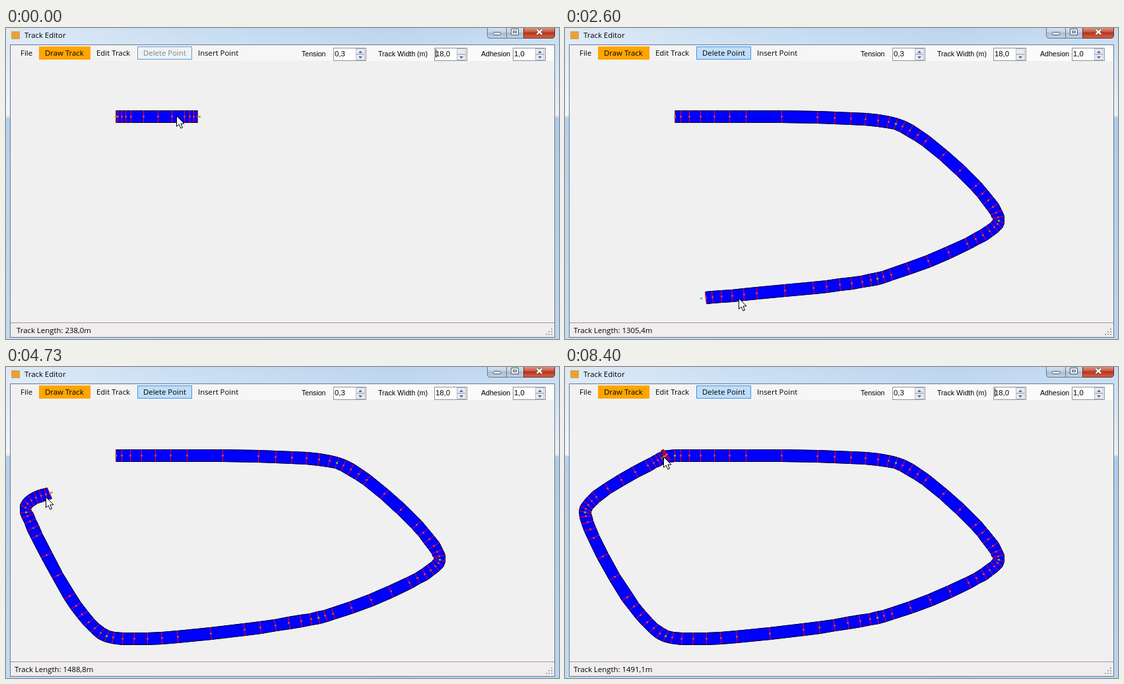
An HTML page with a canvas that plays this animation: 838x472 px, repeating every 8600 ms.

```html
<!DOCTYPE html>
<html lang="en">
<head>
<meta charset="utf-8">
<title>Track Editor</title>
<style>
  html, body { margin: 0; width: 100%; height: 100%; overflow: hidden; background: #c4daf0; }
  svg, canvas { position: absolute; left: 0; top: 0; width: 838px; height: 472px; }
  .ui { font: 11.4px "Open Sans", "Noto Sans", sans-serif; }
  .small { font: 10.6px "Liberation Sans", Arial, sans-serif; }
  .num { font: 11.3px "Liberation Sans", Arial, sans-serif; }
</style>
</head>
<body>
<svg viewBox="0 0 838 472">
  <defs>
    <linearGradient id="glass">
      <stop offset="0" stop-color="#dce9f6"/><stop offset=".3" stop-color="#c9def3"/>
      <stop offset=".7" stop-color="#bbd4ee"/><stop offset="1" stop-color="#c6dcf2"/>
    </linearGradient>
    <linearGradient id="side" x2="0" y2="1">
      <stop offset="0" stop-color="#fff" stop-opacity="0"/><stop offset=".28" stop-color="#fff" stop-opacity=".6"/>
      <stop offset=".29" stop-color="#9dc0e6" stop-opacity=".6"/><stop offset="1" stop-color="#b4d0ee" stop-opacity=".6"/>
    </linearGradient>
    <linearGradient id="strip">
      <stop offset="0" stop-color="#f1f1f1"/><stop offset="1" stop-color="#fcfcfc"/>
    </linearGradient>
    <linearGradient id="btn" x2="0" y2="1">
      <stop offset="0" stop-color="#d6e2ef"/><stop offset=".45" stop-color="#c2d2e4"/>
      <stop offset=".5" stop-color="#a6bbd2"/><stop offset="1" stop-color="#bfd3e8"/>
    </linearGradient>
    <linearGradient id="close" x2="0" y2="1">
      <stop offset="0" stop-color="#dd9c8c"/><stop offset=".4" stop-color="#cd5c48"/>
      <stop offset=".5" stop-color="#b8321c"/><stop offset="1" stop-color="#d06a48"/>
    </linearGradient>
  </defs>
  <rect width="838" height="472" fill="url(#glass)"/>
  <rect width="838" height="472" fill="url(#side)"/>
  <rect x="8" y="5" width="13" height="12" fill="#e5a23c"/>
  <text class="ui" x="28" y="15">Track Editor</text>

  <g stroke="#66788c">
    <path d="M729.5-1V11q0 4.500 4.500 4.500H758.500V-1zM758.500-1V15.500H784.500V-1z" fill="url(#btn)"/>
    <path d="M784.500-1V15.500H827q4.500 0 4.500-4.500V-1z" fill="url(#close)" stroke="#6b2b25"/>
  </g>
  <g fill="#fff" stroke="#4a5566">
    <rect x="738.500" y="6.500" width="11" height="4" rx="1"/>
    <path d="M765.500 1.500h11v9h-11zM768.500 4.500v3h5v-3z" fill-rule="evenodd"/>
  </g>
  <path d="M804.500 2.500l7.500 7m0-7l-7.500 7" stroke="#5d3a3a" stroke-width="4"/>
  <path d="M804.500 2.500l7.500 7m0-7l-7.500 7" stroke="#fff" stroke-width="2.400"/>

  <rect x="6.500" y="25.500" width="825" height="444" fill="#f0f0f0" stroke="#66788c"/>
  <rect x="7" y="26" width="824" height="24" fill="url(#strip)"/>
  <rect x="50" y="28" width="78" height="20" fill="#ffa500"/>
  <rect id="del" x="199.500" y="28.500" width="82" height="19"/>
  <g class="ui">
    <text x="22" y="42">File</text>
    <text x="59" y="42">Draw Track</text>
    <text x="137" y="42">Edit Track</text>
    <text id="delText" x="208" y="42">Delete Point</text>
    <text x="291" y="42">Insert Point</text>
  </g>
  <g class="small">
    <text x="448" y="43">Tension</text>
    <text x="564" y="43">Track Width (m)</text>
    <text x="720" y="43">Adhesion</text>
  </g>
  <g id="boxes"></g>
  <path id="caret" d="M651.500 32v13" stroke="#000"/>

  <rect x="7" y="447" width="824" height="22" fill="#f1eded"/>
  <path d="M7 447.500H831" stroke="#8f8f8f"/>
  <path d="M7 448.500H831" stroke="#fff"/>
  <text class="ui" id="status" y="463"></text>
  <g id="grip" fill="#a8a8a8"></g>
</svg>
<canvas id="view" width="838" height="472"></canvas>

<script>
const $ = id => document.getElementById(id);
const ctx = $('view').getContext('2d');
const LOOP = 8600, STEP = 1000 / 15;
const TENSION = 0.3, HALF = 9, FLAT = 6;
const START = [166, 134];

// Each click fixes a track point; the mouse then glides through rows of [step, x, y, metres].
const strokes = [
  { click: -1, way: [[-1, 258, 133, 190], [0, 293, 134, 238], [6, 501, 145, 655]] },
  { click: 10, way: [[9, 501, 145, 655], [11, 615, 207, 920], [12, 661, 246, 1030.8], [16, 657, 292, 1072]] },
  { click: 19, way: [[18, 657, 292, 1072], [21, 651, 335, 1120], [22, 632, 354, 1136.3], [26, 473, 380, 1209]] },
  { click: 32, way: [[31, 473, 380, 1209], [38, 263, 410, 1288], [39, 206, 410, 1305.4], [42, 152, 408, 1331]] },
  { click: 45, way: [[44, 152, 408, 1331], [54, 22, 240, 1478], [60, 30, 220, 1492.4]] },
  { click: 62, way: [[64, 30, 220, 1492.4], [79, 145, 132, 1482], [80, 148, 133, 1482.9], [83, 149, 136, 1484.3]] },
  { click: 99, way: [[99, 149, 136, 1491.1]] }
];

// Hermite glide that rests at both ends of a stroke.
function glide(way, k) {
  const n = way.length - 1;
  if (k <= way[0][0]) return way[0].slice(1);
  if (k >= way[n][0]) return way[n].slice(1);
  const i = way.findIndex(r => r[0] > k) - 1, a = way[i], b = way[i + 1];
  const slope = (m, j) => m && m < n ? (way[m + 1][j] - way[m - 1][j]) / (way[m + 1][0] - way[m - 1][0]) : 0;
  const h = b[0] - a[0], u = (k - a[0]) / h, s = u * u * (3 - 2 * u);
  return [1, 2, 3].map(j => a[j] + (b[j] - a[j]) * s
    + h * u * (1 - u) * ((1 - u) * slope(i, j) - u * slope(i + 1, j)));
}
const mouse = k => glide(strokes.filter(s => s.way[0][0] <= k).pop()?.way || strokes[0].way, k);

// Hybrid forward differencing with adaptive step size.
function flatten(a, b, c, d) {
  const axes = [0, 1].map(j => ({
    p: a[j], e1: d[j] - a[j], e2: 6 * (b[j] - 2 * c[j] + d[j]), e3: 6 * (a[j] - 2 * b[j] + c[j])
  }));
  const rough = () => axes.some(q => Math.max(Math.abs(q.e2), Math.abs(q.e3)) > FLAT);
  const loose = () => axes.every(q => Math.max(Math.abs(q.e3), Math.abs(2 * q.e2 - q.e3)) <= FLAT / 4);
  let n = 1;
  const halve = () => {
    n *= 2;
    for (const q of axes) { q.e2 = (q.e2 + q.e3) / 8; q.e1 = (q.e1 - q.e2) / 2; q.e3 /= 4; }
  };
  const double = () => {
    n /= 2;
    for (const q of axes) { q.e1 += q.e1 + q.e2; q.e3 *= 4; q.e2 = q.e2 * 8 - q.e3; }
  };
  while (rough() && n < 64) halve();
  const out = [];
  for (;;) {
    if (rough()) halve();
    while (n % 2 === 0 && loose()) double();
    if (--n < 1) break;
    for (const q of axes) {
      const e = q.e2;
      q.p += q.e1; q.e1 += e; q.e2 += e - q.e3; q.e3 = e;
    }
    out.push([axes[0].p, axes[1].p]);
  }
  out.push(d);
  return out;
}

function spline(pts) {
  const at = i => pts[Math.max(0, Math.min(pts.length - 1, i))];
  const handle = (i, s) => at(i).map((v, j) => v + s * TENSION / 3 * (at(i + 1)[j] - at(i - 1)[j]));
  const out = [pts[0]];
  for (let i = 0; i < pts.length - 1; i++)
    out.push(...flatten(pts[i], handle(i, 1), handle(i + 1, -1), pts[i + 1]));
  return out;
}

const snap = v => Math.round(v) + .5;
function poly(pts, stroke, fill) {
  ctx.beginPath();
  pts.forEach(p => ctx.lineTo(snap(p[0]), snap(p[1])));
  if (fill) { ctx.closePath(); ctx.fillStyle = fill; ctx.fill(); }
  ctx.strokeStyle = stroke;
  ctx.stroke();
}

function dot(p, color, r) {
  ctx.fillStyle = color;
  ctx.beginPath();
  ctx.arc(snap(p[0]), snap(p[1]), r, 0, 7);
  ctx.fill();
}

function drawTrack(pts) {
  const line = spline(pts), end = pts[pts.length - 1];
  const closed = pts.length > 3 && Math.hypot(end[0] - START[0], end[1] - START[1]) < 25;
  const ribs = [];
  line.forEach((p, i) => {
    const q = line[i + 1] || (closed && START);
    if (!q) return;
    const dx = q[0] - p[0], dy = q[1] - p[1], len = Math.hypot(dx, dy);
    if (len < .01) return;
    const nx = -dy / len * HALF, ny = dx / len * HALF;
    ribs.push([[p[0] - nx, p[1] - ny], [p[0] + nx, p[1] + ny]]);
  });
  const loop = closed ? [...ribs, ribs[0]] : ribs;
  ctx.lineWidth = 1;
  for (let i = 1; i < loop.length; i++) {
    const [a, b] = loop[i - 1], [c, d] = loop[i];
    poly([a, b, d, c], '#00f', '#00f');
    poly([a, c], '#000020');
    poly([b, d], '#000020');
  }
  ribs.forEach(r => poly(r, '#f00'));
  line.slice(0, closed ? undefined : -1).forEach(p => dot(p, '#ff4530', 1.4));
  pts.forEach(p => dot(p, '#2be32b', 1.6));
}

function drawCursor(x, y) {
  ctx.lineWidth = 1;
  ctx.save();
  ctx.translate(snap(x), snap(y));
  const arrow = new Path2D('M0 0V16L3.700 12.600L6.400 18.700L9 17.600L6.400 11.600H11.500z');
  ctx.fillStyle = '#fff';
  ctx.fill(arrow);
  ctx.strokeStyle = '#000';
  ctx.stroke(arrow);
  ctx.restore();
}

function buildChrome() {
  const box = (x, text, id) => `<rect x="${x + .5}" y="30.500" width="49" height="19" fill="#fff" stroke="#8f9299"/>
    <text class="num" x="${x + 2}" y="43">${text}</text>
    <g fill="#e9ebf0" stroke="#b9bdc8"><rect x="${x + 34.5}" y="31.500" width="13" height="8"/>
    <rect x="${x + 34.5}" y="40.500" width="13" height="8"/></g>
    <path id="${id}" d="M${x + 38} 38l3-3.500l3 3.500z" fill="#5068b0"/>
    <path d="M${x + 38} 43l3 3.500l3-3.500z" fill="#5068b0"/>`;
  $('boxes').innerHTML = box(496, '0,3', 'upTension') + box(649, '18,0', 'upWidth') + box(768, '1,0', 'upAdhesion');
  let dots = '';
  for (let r = 0; r < 3; r++)
    for (let c = 2 - r; c < 3; c++)
      dots += `<rect x="${818 + c * 4}" y="${456 + r * 4}" width="2" height="2"/>`;
  $('grip').innerHTML = dots;
}

function render(t) {
  const k = Math.floor((t + 4) / STEP);
  const fixed = strokes.filter(s => s.click > 0 && s.click <= k).map(s => s.way[0].slice(1, 3));
  const [x, y, meters] = mouse(k);
  ctx.clearRect(0, 0, 838, 472);
  drawTrack([START, ...fixed, [x, y]]);
  drawCursor(...mouse(k - 1));

  $('status').textContent = 'Track Length: ' + meters.toFixed(1).replace('.', ',') + 'm';
  $('status').setAttribute('x', meters < 1000 ? 16 : 13);
  $('caret').style.opacity = Math.floor((k + 5) / 8) % 2 ? 0 : 1;
  const arrowOn = (k >= 6 && k < 19) || (k >= 53 && k < 99) || k >= 126;
  $('upWidth').style.opacity = arrowOn ? 1 : 0;
  $('del').style.fill = k ? '#c0ddf9' : '#eef2f6';
  $('del').style.stroke = k ? '#3c93e6' : '#5b9bd5';
  $('delText').style.fill = k ? '#000' : '#858585';
}

buildChrome();
const begin = performance.now();
function tick() {
  render((performance.now() - begin) % LOOP);
  requestAnimationFrame(tick);
}
tick();
</script>
</body>
</html>
```
